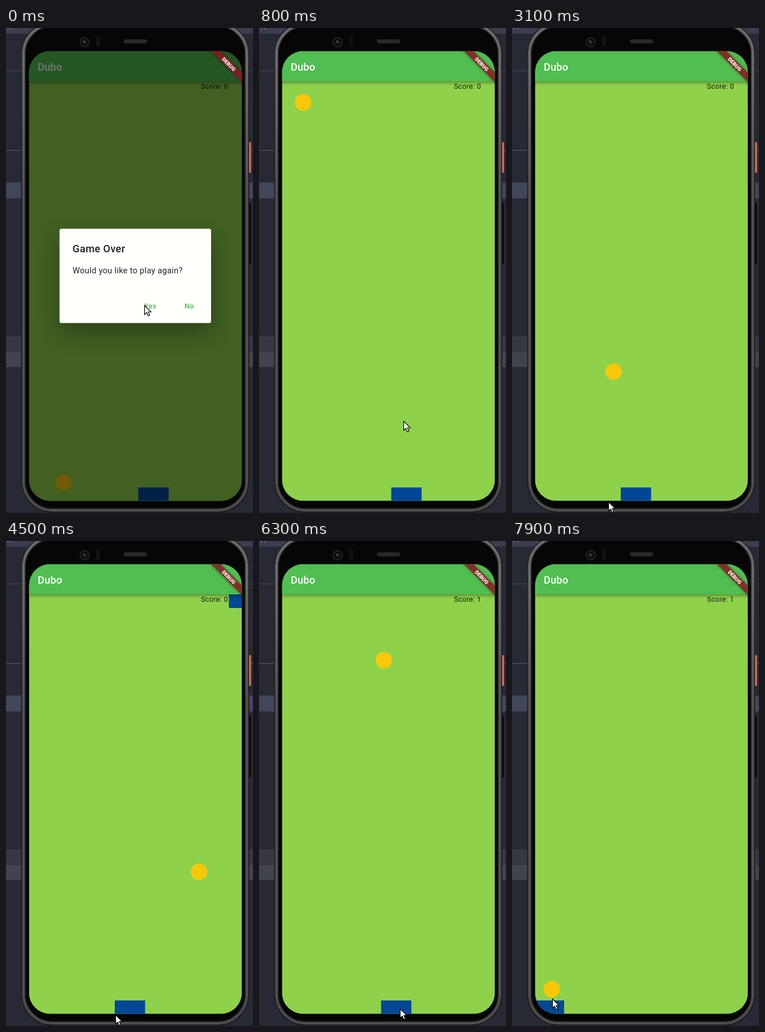
Recreate the animation shown at these times as an HTML page with a canvas. Size 436 by 854 pixels, loop 8000 ms.

```html
<!DOCTYPE html>
<html lang="en">
<head>
<meta charset="utf-8">
<title>Paddle game</title>
<style>
  html, body { margin: 0; width: 100%; height: 100%; overflow: hidden; background: #272935; }
  canvas { display: block; width: 436px; height: 854px; }
</style>
</head>
<body>
<canvas id="stage" width="436" height="854"></canvas>
<script>
const ctx = document.getElementById('stage').getContext('2d');
const LOOP = 8000, STEP = 100;
const SCREEN = { x: 40.6, y: 40.6, w: 375.8, h: 792, r: 37 };
const BAR_BOTTOM = 94;
const BAT = { w: 53.5, h: 24, y: 809, color: '#034798' };

// Limits for the centre of the ball
const WALL = { left: 55.5, right: 401.5, top: 108.5, bottom: 794.5 };
const RESTART = 600, SERVE = 690, RETURN = 3880, MISS = 5886, RESUME = 6020, LAND = 7915;
const WALL_HITS = [SERVE, 2400, 3490, 4716, 5780, 6870, 7945];

const ramp = (t, from, to) => Math.min(1, Math.max(0, (t - from) / (to - from)));
const mix = (a, b, k) => a + (b - a) * k;

// The ball crosses from wall to wall, at a new speed after each hit
function ballX(t) {
  return WALL_HITS.slice(1).reduce((x, hit, i) => {
    const dir = i % 2 ? -1 : 1;
    return x + dir * (WALL.right - WALL.left) * ramp(t, WALL_HITS[i], hit);
  }, WALL.left);
}

function ballY(t) {
  const { top, bottom } = WALL;
  if (t < 3100) return mix(top, 605, ramp(t, SERVE, 3100));
  if (t < RETURN) return mix(605, bottom, ramp(t, 3100, RETURN));
  if (t < RESUME) return mix(bottom, top, ramp(t, RETURN, MISS));
  return mix(top, bottom, ramp(t, RESUME, LAND));
}

function batX(t) {
  return 233.5 - 41.5 * ramp(t, 2300, 3000) - 9.5 * ramp(t, 4900, 5300)
    + 77 * ramp(t, 6000, 6700) - 221 * ramp(t, 7100, 7900);
}

function mouseAt(t) {
  const leave = ramp(t, 600, 800), back = ramp(t, 7100, 7900);
  return {
    x: 244 + 11 * leave - 85 * ramp(t, 1900, 3100) + 23 * ramp(t, 3700, 4500)
      + 24 * ramp(t, 4500, 5300) + 74 * ramp(t, 6000, 6700) - 220 * back,
    y: 488 + 204 * leave + 142 * ramp(t, 1900, 2500) - 11 * ramp(t, 4500, 5300)
      + ramp(t, 6000, 6700) - 18 * back
  };
}

function rect(x, y, w, h, color) {
  ctx.fillStyle = color;
  ctx.fillRect(x, y, w, h);
}

function round(x, y, w, h, r, fill, stroke, width = 1) {
  ctx.beginPath();
  ctx.roundRect(x, y, w, h, r);
  if (fill) { ctx.fillStyle = fill; ctx.fill(); }
  if (stroke) { ctx.strokeStyle = stroke; ctx.lineWidth = width; ctx.stroke(); }
}

function disc(x, y, r, color) {
  ctx.beginPath();
  ctx.arc(x, y, r, 0, Math.PI * 2);
  ctx.fillStyle = color;
  ctx.fill();
}

function text(str, x, y, size, color, weight = 400, spacing = 0) {
  ctx.font = `${weight} ${size}px Roboto, sans-serif`;
  ctx.letterSpacing = spacing + 'px';
  ctx.fillStyle = color;
  ctx.fillText(str, x, y);
}

function shadow(color, blur, dy) {
  ctx.shadowColor = color;
  ctx.shadowBlur = blur;
  ctx.shadowOffsetY = dy;
}

function drawDesk() {
  rect(0, 0, 436, 854, '#272935');
  rect(0, 0, 436, 10, '#3a3e50');
  text('=1  -', 1, 3, 11, '#8b8f9c');
  rect(0, 75, 436, 1, '#4b4d58');
  rect(0, 215, 436, 1, '#5c5e68');
  rect(0, 272, 436, 28, '#42465a');
  rect(0, 543, 436, 26, '#363944');
  rect(0, 570, 436, 27, '#41434f');
}

function drawPhone() {
  round(427, 201, 5.5, 54, 1, '#d9705f');
  round(427, 308, 5.5, 108, 1, '#0b0b0d');
  round(27, -10, 402, 863, 55, '#060606');

  // Metal rim: brightest in the middle, fading down the side
  for (let i = 0; i < 8; i++) {
    const inset = i + 0.5, glow = Math.sin(Math.PI * inset / 8);
    const shine = ctx.createLinearGradient(0, 0, 0, 300);
    const grey = v => `rgb(${[v, v, v].map(n => Math.round(n * glow + 6))})`;
    shine.addColorStop(0, grey(115));
    shine.addColorStop(1, grey(80));
    round(27 + inset, -10 + inset, 402 - 2 * inset, 863 - 2 * inset, 55 - inset, null, shine, 1.3);
  }

  disc(139, 25, 9.5, '#1b1b1b');
  disc(139, 25, 6, '#0a0a0a');
  disc(139, 25, 3, '#252a2b');
  disc(137.5, 23.5, 1.3, '#5b6463');
  round(159, 14, 7, 19, 3, '#121212');
  round(208, 20, 41, 7, 3, '#292929');
}

function drawGame(t) {
  const x = ballX(t);
  rect(SCREEN.x, BAR_BOTTOM, SCREEN.w, 740, '#8ed24b');
  text(`Score: ${t < MISS ? 0 : 1}`, 344, 106.5, 12.8, 'rgba(0,0,0,.87)', 400, 0.23);

  if (t < RESTART) disc(101.5, 800, 14.5, '#f8c808');
  else disc(x, ballY(t), 14.5, '#f8c808');
  rect(batX(t), BAT.y, BAT.w, BAT.h, BAT.color);

  // The rival's bat shows only while the ball flies up
  if (t > RETURN && t < MISS) {
    rect(186.5 + 0.726 * (x - WALL.left), BAR_BOTTOM, BAT.w, BAT.h, BAT.color);
  }

  ctx.save();
  shadow('rgba(0,0,0,.4)', 6, 2);
  rect(SCREEN.x - 10, SCREEN.y, SCREEN.w + 20, BAR_BOTTOM - SCREEN.y, '#51be51');
  ctx.restore();
  text('Dubo', 56, 75, 18.24, '#fff', 500, 0.14);
}

function drawDialog(t) {
  const alpha = 1 - ramp(t, 560, 760);
  if (!alpha) return;
  ctx.save();
  ctx.globalAlpha = alpha;
  rect(SCREEN.x, SCREEN.y, SCREEN.w, SCREEN.h, 'rgba(0,0,0,.54)');
  ctx.save();
  shadow('rgba(0,0,0,.32)', 38, 16);
  round(94.5, 353.5, 267.5, 166, 3.6, '#fffffc');
  ctx.restore();
  const press = ramp(t, 100, 300) - ramp(t, 300, 400);
  round(226, 473, 58, 33, 3.6, `rgba(76,175,80,${0.16 * press})`);
  text('Game Over', 117.5, 394.5, 18.24, 'rgba(0,0,0,.87)', 500, 0.3);
  text('Would you like to play again?', 117.5, 431.5, 14.6, 'rgba(0,0,0,.87)', 400, 0.28);
  text('Yes', 244, 494, 12.8, '#53b955', 500, 0.2);
  text('No', 315, 494, 12.8, '#53b955', 500, 0.2);
  ctx.restore();
}

function drawBanner(color) {
  ctx.save();
  ctx.translate(416, 41);
  ctx.rotate(Math.PI / 4);
  ctx.save();
  shadow('rgba(0,0,0,.5)', 5, 0);
  rect(-60, 26.5, 120, 11.5, color);
  ctx.restore();
  ctx.textAlign = 'center';
  text('DEBUG', 0, 35.5, 9.3, '#fff', 900);
  ctx.restore();
}

function drawMouse({ x, y }) {
  ctx.save();
  ctx.translate(x, y);
  const arrow = new Path2D('M.5 .5V16.5L4.2 13 6.8 19 9.6 17.8 7 12H12Z');
  ctx.fillStyle = '#fff';
  ctx.fill(arrow);
  ctx.strokeStyle = '#000';
  ctx.lineWidth = 1.2;
  ctx.stroke(arrow);
  ctx.restore();
}

function draw(t) {
  drawDesk();
  drawPhone();
  ctx.save();
  ctx.beginPath();
  ctx.roundRect(SCREEN.x, SCREEN.y, SCREEN.w, SCREEN.h, SCREEN.r);
  ctx.clip();
  drawGame(t);
  drawDialog(t);
  drawBanner(t < RESTART ? '#7b2020' : '#823027');
  ctx.restore();
  drawMouse(mouseAt(t));
}

const start = performance.now();
function tick() {
  const t = (performance.now() - start) % LOOP;
  draw(Math.floor(t / STEP) * STEP);
  requestAnimationFrame(tick);
}
tick();
</script>
</body>
</html>
```
